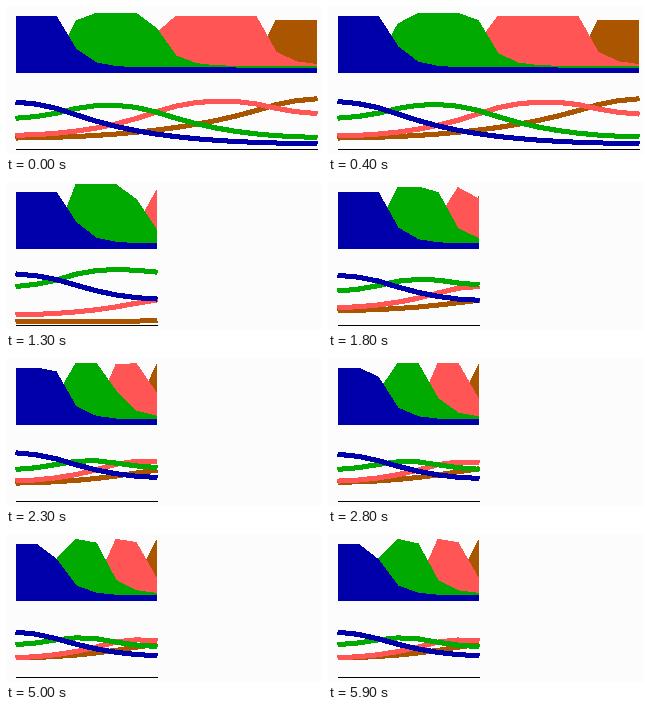
Recreate the animation shown at these times as a matplotlib script. Size 316 by 148 pixels, loop 6100 ms.

```python
import numpy as np
import matplotlib.pyplot as plt
from matplotlib.animation import FuncAnimation
from matplotlib.patches import Polygon

W, H, DPI = 316, 148, 100
STEP = 100                      # ms per frame
FRAMES = 61
CUT = 1.1                       # seconds until the right half is removed
CELLS, CUT_CELLS = 16, 8
LEFT, PITCH = 10, 20            # first cell and cell spacing in pixels
AREA_BASE, LINE_BASE = 66, 143
RISE, FALL = 2.2, 1.3           # steepness of the two flanks of a domain
FAR = 99                        # an edge outside the stage


class Domain:
    """One colour: a block of active cells and the signal it spreads."""

    def __init__(self, color, floor, gain, spread, wide, cut):
        self.color = color
        self.floor = floor      # resting level of the area
        self.gain = gain        # strength of the signal
        self.spread = spread    # reach of the signal in cells
        self.wide = wide        # (from, to) for rise, fall and height
        self.cut = cut          # (from, to, time constant) for the same

    def shape(self, t):
        if t < CUT:
            return [a + (b - a) * t for a, b in self.wide]
        return [b + (a - b) * np.exp((CUT - t) / tau)
                for a, b, tau in self.cut]

    def activity(self, t, n):
        rise, fall, height = self.shape(t)
        cell = np.arange(n)
        up = np.exp(np.minimum(0, RISE * (cell - rise)))
        down = np.exp(np.minimum(0, FALL * (fall - cell)))
        return height * up * down

    def signal(self, activity):
        """Steady diffusion with decay between closed ends."""
        n = len(activity)
        lap = np.eye(n, k=1) + np.eye(n, k=-1)
        lap -= np.diag(lap.sum(axis=1))
        return 2 + self.gain * np.linalg.solve(
            np.eye(n) - self.spread**2 * lap, activity)


domains = [
    Domain("#0000aa", 4, 1.55, 4.2,
           [(-FAR, -FAR), (2.2, 2.45), (52, 52)],
           [(-FAR, -FAR, 1), (2.45, 1.72, 1), (52, 52, 1)]),
    Domain("#00aa00", 5.5, 1.6, 4.2,
           [(3.07, 3.15), (6.75, 7.1), (53, 53)],
           [(3.15, 2.2, 0.9), (6.3, 3.93, 0.8), (60, 55, 0.3)]),
    Domain("#ff5555", 6.5, 1.63, 4.2,
           [(7.2, 7.58), (12, 12), (49, 49)],
           [(7.58, 4.82, 0.45), (8.5, 5.95, 0.65), (49, 54, 0.3)]),
    Domain("#aa5500", 4, 2.45, 6,
           [(13, 13), (FAR, FAR), (48, 48)],
           [(9, 6.6, 0.43), (FAR, FAR, 1), (48, 56, 0.3)]),
]

fig = plt.figure(figsize=(W / DPI, H / DPI), dpi=DPI, facecolor="#fcfcfc")
ax = fig.add_axes([0, 0, 1, 1])
ax.set_xlim(0, W)
ax.set_ylim(H, 0)
ax.axis("off")


def stroke(color, width, z):
    line, = ax.plot([], [], color=color, lw=width * 72 / DPI, zorder=z,
                    antialiased=False, solid_capstyle="butt")
    return line


axis = stroke("black", 1, 1)
areas, lines = [], []
for z, d in zip(range(9, 0, -1), domains):
    patch = Polygon([(0, 0), (1, 0), (1, 1)], facecolor=d.color,
                    edgecolor="none", antialiased=False, zorder=z)
    areas.append(ax.add_patch(patch))
    lines.append(stroke(d.color, 4, z))


def draw(k):
    t = min(k, FRAMES - 2) * STEP / 1000
    n = CELLS if t < CUT else CUT_CELLS
    x = LEFT + PITCH * np.arange(n)
    x[-1] += 1
    bottom = [(x[-1], AREA_BASE + 1), (x[0], AREA_BASE + 1)]
    for d, area, line in zip(domains, areas, lines):
        act = d.activity(t, n)
        top = np.column_stack([x, AREA_BASE - d.floor - act])
        area.set_xy(np.vstack([top, bottom]))
        line.set_data(x, LINE_BASE - d.signal(act))
    axis.set_data([x[0], x[-1]], [LINE_BASE, LINE_BASE])
    return areas + lines + [axis]


anim = FuncAnimation(fig, draw, frames=FRAMES, interval=STEP,
                     repeat=True, repeat_delay=0, blit=False)
plt.show()
```
